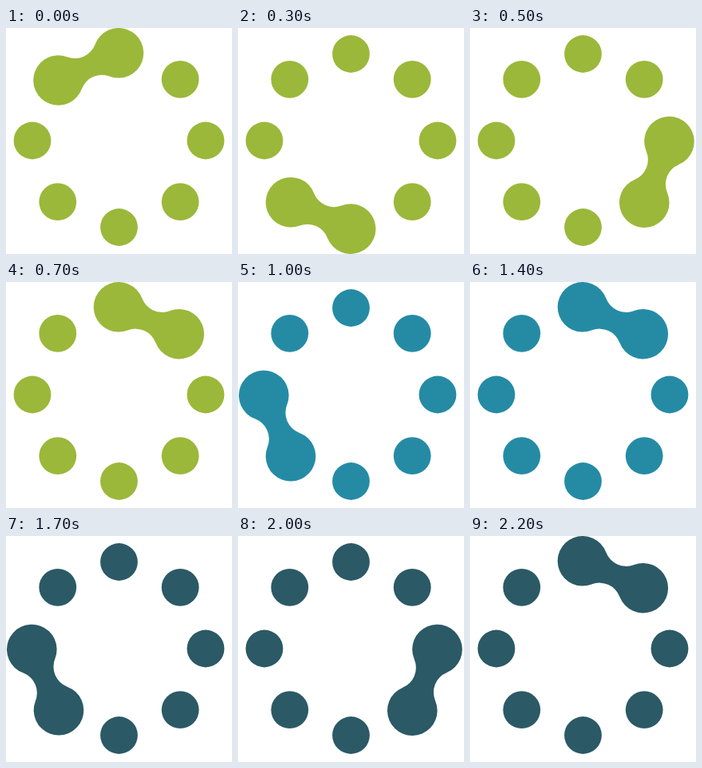
An HTML page with a canvas for the animation above (2300 ms loop, 283 by 283 pixels).

```html
<!DOCTYPE html>
<html lang="en">
<head>
<meta charset="utf-8">
<title>Loading ring</title>
<style>
  html, body { margin: 0; width: 100%; height: 100%; overflow: hidden; background: #fff; }
  canvas { display: block; width: 283px; height: 283px; }
</style>
</head>
<body>
<canvas id="stage"></canvas>
<script>
const SIZE = 283, STEP = 100;
const DOT = 23.4, BLOB = 31.3, NECK = 27;

// Each lap runs counter-clockwise; numbers are slots, clockwise from the top.
const laps = [
  { color: '#9bb83a', slots: [7, 6, 5, 4, 3, 2, 1, 0] },
  { color: '#258ba5', slots: [7, 6, 5, 4, 2, 1, 0] },
  { color: '#2b5966', slots: [7, 6, 5, 4, 3, 2, 1, 0] }
];
const poses = laps.flatMap(({ color, slots }) => slots.map(slot => ({ color, slot })));

const dots = Array.from({ length: 8 }, (_, i) => {
  const a = i * Math.PI / 4;
  return [141.5 + 108.5 * Math.sin(a), 141 - 108.5 * Math.cos(a)];
});
const blobs = [
  [141, 31.3], [216.8, 65.2], [249.5, 142], [218.3, 218.7],
  [141.2, 251.6], [66, 218.2], [32.3, 142], [65.5, 65.5]
];

const canvas = document.getElementById('stage');
const ctx = canvas.getContext('2d');
const ratio = window.devicePixelRatio || 1;
canvas.width = canvas.height = Math.round(SIZE * ratio);
ctx.scale(ratio, ratio);

function drawDot([x, y]) {
  ctx.beginPath();
  ctx.arc(x, y, DOT, 0, 2 * Math.PI);
  ctx.fill();
}

// Two discs joined by concave arcs that touch both of them.
function drawPair([ax, ay], [bx, by]) {
  const PI = Math.PI, reach = BLOB + NECK;
  const axis = Math.atan2(by - ay, bx - ax);
  const open = Math.acos(Math.hypot(bx - ax, by - ay) / 2 / reach);
  const neck = (x, y, dir) => {
    const a = dir - open;
    ctx.arc(x + reach * Math.cos(a), y + reach * Math.sin(a), NECK, a + PI, dir + open, true);
  };
  ctx.beginPath();
  ctx.arc(ax, ay, BLOB, axis + open, axis - open + 2 * PI);
  neck(ax, ay, axis);
  ctx.arc(bx, by, BLOB, axis + PI + open, axis - open + 3 * PI);
  neck(bx, by, axis + PI);
  ctx.closePath();
  ctx.fill();
}

function draw({ color, slot }) {
  const next = (slot + 1) % 8;
  ctx.fillStyle = '#fff';
  ctx.fillRect(0, 0, SIZE, SIZE);
  ctx.fillStyle = color;
  dots.forEach((dot, i) => { if (i !== slot && i !== next) drawDot(dot); });
  drawPair(blobs[slot], blobs[next]);
}

const start = performance.now();
function tick() {
  const time = Math.max(0, performance.now() - start);
  draw(poses[Math.floor(time / STEP) % poses.length]);
  requestAnimationFrame(tick);
}
tick();
</script>
</body>
</html>
```
